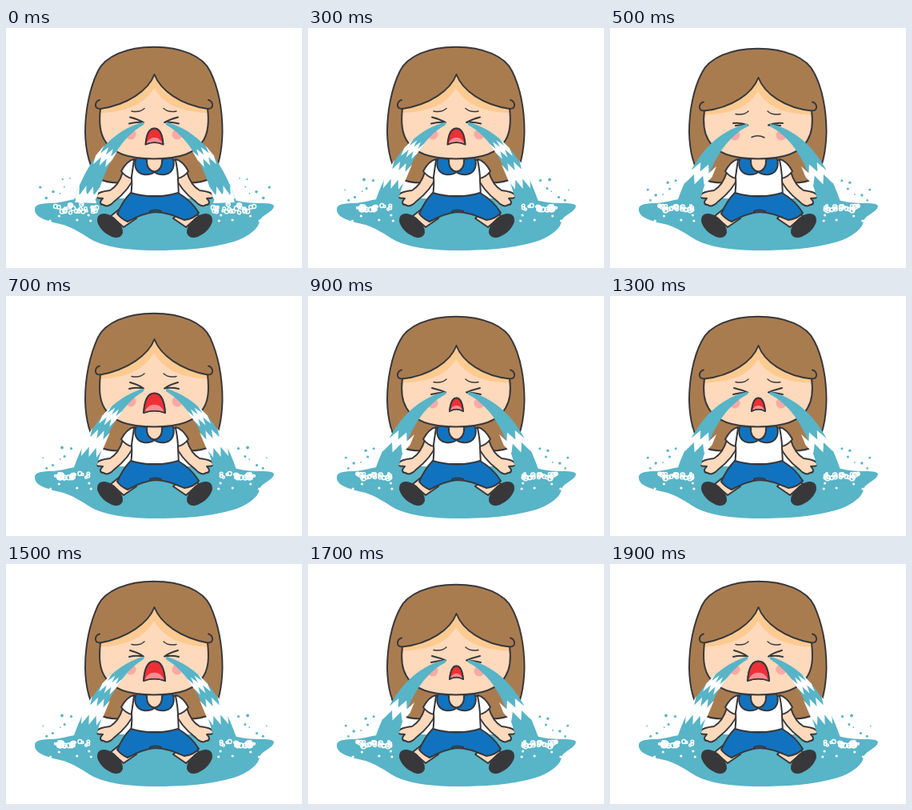
Write an HTML page that moves like this. It is 370x300 px and loops after 2 s.

```html
<!DOCTYPE html>
<html lang="en">
<head>
<meta charset="utf-8">
<title>Crying girl</title>
<style>
html, body { margin: 0; width: 100%; height: 100%; overflow: hidden; background: #fff; }
svg { display: block; width: 100vw; height: 100vh; }
</style>
</head>
<body>
<svg id="stage" viewBox="0 0 370 300"></svg>
<script>
const stage = document.getElementById('stage');
const INK = '#38383b', SKIN = '#fed9bc', HAIR = '#a97c50', BLUE = '#1173bf', WATER = '#58b4c7';
const STEP = 100, STEPS = 20;

// A held cry, a gulp, then steady sobbing. One pose per step.
const MOUTHS = 'MMMMSC' + 'MLMS'.repeat(3) + 'ML';
const POSES = {
  C: { bob: 1 },
  S: { bob: 1, top: 127.5, bottom: 144, half: 8.5 },
  M: { bob: 0, top: 125.5, bottom: 145.5, half: 11 },
  L: { bob: -1, top: 121.5, bottom: 146, half: 13.5 }
};
// White breaks along the stream: start, end, spill past the edges
const BREAKS = [
  [[.5, .62, .04], [.9, 1, 0]],
  [[.68, .8, .22]],
  [[.3, .38, 0], [.8, .92, .12]],
  [[.4, .53, .02], [.67, .84, .05]]
];

const path = (d, fill = 'none', stroke = INK, width = 2) =>
  `<path d="${d}" fill="${fill}" stroke="${stroke}" stroke-width="${width}" stroke-linejoin="round" stroke-linecap="round"/>`;
const dot = (x, y, r, fill) => `<circle cx="${x.toFixed(1)}" cy="${y.toFixed(1)}" r="${r.toFixed(1)}" fill="${fill}"/>`;
const ring = (x, y, r) => `<circle cx="${x.toFixed(1)}" cy="${y.toFixed(1)}" r="${r.toFixed(1)}" fill="none" stroke="#fff" stroke-width="1.5"/>`;
const both = (s, axis = 186) => s + `<g transform="translate(${axis * 2} 0) scale(-1 1)">${s}</g>`;

function random(seed) {
  return () => (seed = (seed * 16807) % 2147483647) / 2147483647;
}

const PUDDLE = path('M36 226C36 220 46 219 58 219C72 218 80 214 95 213H275C290 216 300 219 315 219C325 219 335 219 335 223C333 231 320 233 317 241C316 252 300 262 285 267C255 276 220 278 185 278C150 278 122 273 106 264C95 257 84 250 72 246C55 242 35 238 36 226Z', WATER, 'none');

function hair(b) {
  const y = 23.7 + 2 * b;
  return path(`M185 ${y}C220 ${y} 246 ${y + 12} 255 ${y + 30}C266 76 270.5 105 270.5 130C270 155 265 175 257 188Q240 195 222 193H150Q128 195 115 188C105 175 99.5 155 99 130C99 105 104 76 115 ${y + 30}C124 ${y + 12} 150 ${y} 185 ${y}Z`, HAIR);
}

function body() {
  const arm = both(
    path('M146 180C143 190 137 199 130 203C122 204 112 206 113 211C114 214 118 212 121 213C116 218 118 221 122 221C125 224 131 222 135 217C144 210 155 200 160 186Z', SKIN) +
    path('M160 164Q151 166 144 179Q150 187 158 188L165 178Z', '#fff'));
  const leg = both(
    path('M146 223L131 235L147 249L163 238Z', SKIN) +
    path('M116 236C120 231 129 233 135 238C141 244 146 251 145 256C142 263 134 262 129 258C121 254 112 243 116 236Z', INK));
  const shirt = path('M160 165Q186 170 212 165Q215 180 215 190L216 210H156Q158 195 157 186Z', '#fff');
  const shorts = path('M156 206Q186 215 215 206C225 212 235 221 241 231Q234 239 223 240C211 235 200 230 186 230C174 231 163 236 152 242Q143 238 139 232C144 221 149 213 156 206Z', BLUE) +
    path('M180 229Q186 226 194 229');
  const neck = path('M173 160H198L194 177Q186 182 177 177Z', SKIN);
  const collar = both(path('M163 162C159 171 162 181 172 183Q181 184 185.5 180Q175 177 176 164Z', BLUE), 185.5);
  return arm + leg + shirt + shorts + neck + collar;
}

function mouth(p) {
  if (!p.top) return path('M177 136.5Q185 133 193 137', 'none', INK, 1.5);
  const { top, bottom, half } = p, x = 185.5, l = x - half, r = x + half, h = bottom - top;
  const base = `Q${x} ${bottom - 5} `;
  const lips = `M${l} ${bottom}C${l + 1} ${top + h * .35} ${x - half * .6} ${top} ${x} ${top}` +
    `S${r - 1} ${top + h * .35} ${r} ${bottom}${base}${l} ${bottom}Z`;
  const tongue = `M${x - half * .9} ${bottom - 1}C${x - half * .6} ${bottom - h * .55} ${x + half * .6} ${bottom - h * .55} ${x + half * .9} ${bottom - 1}${base}${x - half * .9} ${bottom - 1}Z`;
  return path(lips, '#ee3036') + path(tongue, '#f48d92', 'none') + path(lips, 'none', INK, 1.5);
}

function face(p) {
  const b = p.bob, peak = 58 + 4 * b, edge = 101 + 2.5 * b, dy = 3.5 * b;
  const bang = `C178 ${peak + 20} 152 ${peak + 38} 118 ${edge}`;
  const shape = `M185.5 ${peak}${bang}C116 118 117 130 123 140C132 157 155 163.5 185 163.5S238 157 247 140C253 130 254 118 252 ${edge}C218 ${peak + 38} 193 ${peak + 20} 185.5 ${peak}Z`;
  const shade = path(`M185.5 ${peak}${bang}V${edge + 5}C152 ${edge + 4} 174 ${peak + 37} 185.5 ${peak + 16}Z`, '#fdcb91', 'none');
  const hook = path(`M118 ${edge}Q111 ${edge} 112 ${edge - 6}Q113 ${edge - 10} 117 ${edge - 11}`);
  const eye = p.top
    ? `M155 ${111.5 + dy}Q165 ${114 + dy} 172 ${118 + dy * .7}Q163 ${117 + dy} 154 ${119.5 + dy}`
    : 'M154 119Q164 118 172 121.5Q164 121 157 122';
  const brow = `M157 ${104 + dy}Q167 ${106 + dy} 173 ${100.5 + dy}`;
  return path(shape, SKIN, 'none') + both(shade + dot(156, 133 + b, 6.5, '#f9a9a5'), 185) +
    path(shape) + both(hook + path(eye) + path(brow, 'none', INK, 1.4), 185) + mouth(p);
}

const quad = (a, b, c, t) => (1 - t) * (1 - t) * a + 2 * t * (1 - t) * b + t * t * c;

// Point on the stream: s runs down it, u runs across it
function flow(s, u, y0) {
  const ox = quad(172, 113, 84, s), oy = quad(y0 - 1.5, 133, 217, s);
  const ix = quad(172, 132, 112, s), iy = quad(y0 + 2, 143, 217, s);
  return `${(ox + (ix - ox) * u).toFixed(1)} ${(oy + (iy - oy) * u).toFixed(1)}`;
}

function stream(phase, b) {
  const y0 = 119 + 2 * b, left = [], right = [];
  for (let i = 0; i <= 16; i++) {
    left.push(flow(i / 16, 0, y0));
    right.unshift(flow(i / 16, 1, y0));
  }
  let out = path('M' + left.concat(right).join('L') + 'Z', WATER, 'none');
  for (const [from, to, spill] of BREAKS[phase]) {
    const upper = [], lower = [];
    for (let i = 0; i <= 6; i++) {
      const u = -spill + (1 + 2 * spill) * i / 6, jag = i % 2 ? .055 : -.03;
      upper.push(flow(from + jag, u, y0));
      lower.unshift(flow(Math.min(1, to + jag), u, y0));
    }
    out += path('M' + upper.concat(lower).join('L') + 'Z', '#fff', 'none');
  }
  return out;
}

function splash(phase) {
  const rnd = random(71 + phase * 13), tall = phase === 0;
  let out = '';
  if (tall) out += path('M86 218L90 206L95 212L99 203L104 212L110 207L113 219Z', '#fff', 'none');
  for (let i = 0; i < 26; i++) {
    const x = 62 + rnd() * (tall ? 51 : 41);
    out += ring(x, 225 + (rnd() - .5) * (tall ? 12 : 6), 1.2 + rnd() * 2);
  }
  for (const [x, y] of [[45, 198], [57, 207], [70, 188], [80, 185], [50, 211], [68, 204], [74, 197]])
    out += dot(x + (rnd() - .5) * 5, y + (rnd() - .5) * 6 + (tall ? 0 : 3), .8 + rnd() * 1.1, WATER);
  for (const [x, y] of [[55, 241], [90, 240], [104, 234], [106, 241], [66, 235]])
    out += dot(x + (rnd() - .5) * 3, y, 1.6, '#fff');
  return out;
}

const BODY = body();

function draw(step) {
  const pose = POSES[MOUTHS[step]], phase = step % 4;
  stage.innerHTML = PUDDLE + hair(pose.bob) + BODY + face(pose) +
    both(stream(phase, pose.bob) + splash(phase));
}

let shown = -1;
const start = performance.now();
function tick() {
  const step = Math.floor((performance.now() - start) / STEP) % STEPS;
  if (step !== shown) draw(shown = step);
  requestAnimationFrame(tick);
}
tick();
</script>
</body>
</html>
```
